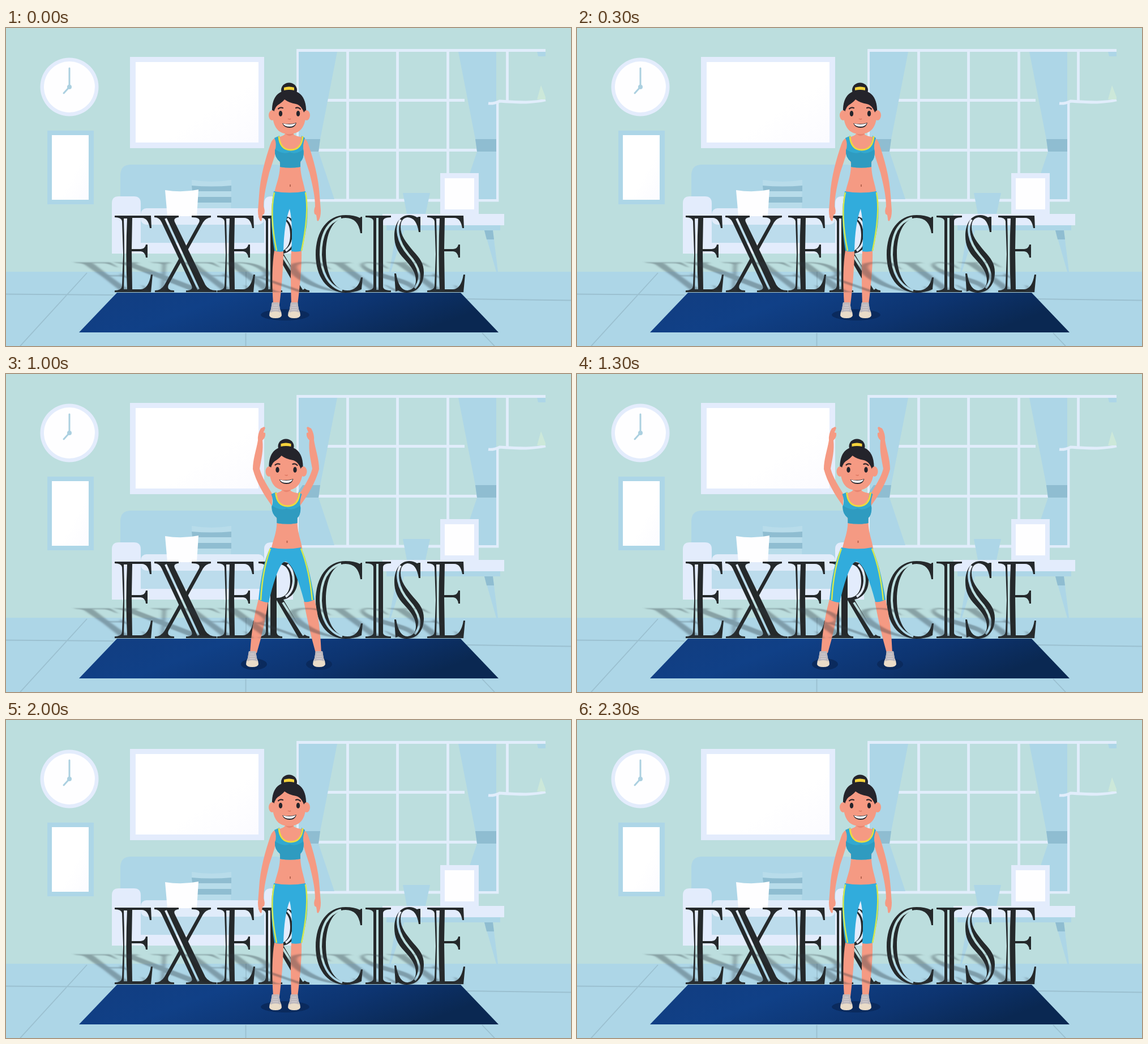
Animation of 998x561 px, one loop 2500 ms. Source, as an HTML page:

```html
<!DOCTYPE html>
<html lang="en">
<head>
<meta charset="utf-8">
<title>Exercise</title>
<style>
  html, body { margin: 0; width: 100%; height: 100%; overflow: hidden; }
  svg { display: block; width: 100%; height: 100%; }
  .pale { fill: #e3ecfc; }
  .blue { fill: #add6e7; }
  .deep { fill: #8fbdd1; }
  .white { fill: #fefeff; }
  .skin { fill: #f59a83; }
  .hair { fill: #24242b; }
  .sport { fill: #31acdc; }
  .line { fill: none; }
</style>
</head>
<body>
<svg viewBox="0 0 998 561">
  <defs>
    <linearGradient id="matFill" x2="1" y2=".25">
      <stop offset="0" stop-color="#123d80"/><stop offset=".35" stop-color="#104087"/>
      <stop offset=".7" stop-color="#0d3470"/><stop offset="1" stop-color="#0a2852"/>
    </linearGradient>
    <linearGradient id="glass" x2="1" y2="1">
      <stop offset=".6" stop-color="#fff"/><stop offset="1" stop-color="#fbfbff"/>
    </linearGradient>
    <filter id="soft" x="-10%" y="-20%" width="120%" height="140%"><feGaussianBlur stdDeviation="2.5"/></filter>

    <path id="e" d="M0 0H64L65 22H62Q59 4 48 4H31L30 59H46Q54 58 55 51H58V74H55Q54 64 46 63H30L31 130H46Q60 129 64 104H67L64 135H0V132Q12 132 13 124L15 68L13 10Q12 3 0 3Z"/>
    <path id="eLine" d="M16 5H22Q19 68 22 130H16Q18 68 16 5Z"/>
    <mask id="inline" maskUnits="userSpaceOnUse" x="180" y="-5" width="650" height="150">
      <path fill="#fff" d="M180-5H830V145H180Z"/>
      <use href="#eLine" x="192"/><use href="#eLine" x="373"/><use href="#eLine" x="744"/>
      <g fill="none" stroke="#000" stroke-width="4">
        <path d="M282 5L340 130M465 5V130M497 5Q508 15 508 34Q507 53 494 62M489 72L526 130"/>
        <path d="M592 4C563 12 556 42 556 69C557 98 568 124 594 132M656 4V131"/>
        <path d="M697 7C688 21 691 45 711 69C731 91 736 112 722 128"/>
      </g>
    </mask>
    <g id="word">
      <use href="#e" x="192"/><use href="#e" x="373"/><use href="#e" x="744"/>
      <path d="M262 0H305V3Q295 4 298 11L352 122Q358 132 372 132V135H318V132Q331 132 328 124L275 12Q271 3 262 3Z"/>
      <path d="M328 0H362V3Q353 4 348 12L287 122Q283 132 297 132V135H263V132Q274 132 280 122L341 12Q345 3 328 3Z"/>
      <path d="M446 0H484C508 0 515 14 515 33C515 52 504 64 490 67L520 118Q527 132 536 132V135H517L478 68V125Q479 132 488 132V135H446V132Q458 132 459 124V10Q458 3 446 3ZM478 4V64C495 64 502 52 502 34C502 15 495 4 478 4Z"/>
      <path d="M629 2V31H626Q622 4 600 4C576 4 565 34 565 67C565 104 580 132 603 132Q622 132 627 109H630L628 130Q615 136 600 136C566 136 547 106 547 69C547 27 568-1 600-1Q615-1 625 4L627 2Z"/>
      <path d="M635 0H680V3Q666 3 666 10V125Q666 132 680 132V135H635V132Q649 132 649 125V10Q649 3 635 3Z"/>
      <path d="M732 2V29H729Q725 3 709 3Q697 5 697 20C697 35 706 46 719 62C731 75 738 84 738 100C738 122 726 136 708 136Q699 136 693 132L688 134L686 102H689Q694 132 709 132Q724 130 724 114C724 101 716 90 704 77C691 64 686 51 686 36C686 14 696-1 712-1Q720-1 726 3L729 2Z"/>
    </g>

    <g id="bust">
      <path class="skin" d="M493 178H508V187Q510 191 527 193L520 240C520 262 526 272 529 291H474C478 272 484 262 484 240L474 194Q492 191 493 186Z"/>
      <path fill="#e98570" d="M493 183Q501 190 508 183V187Q501 194 493 186Z"/>
      <path fill="#32a9d0" d="M474 194L483 190Q485 216 503 216Q521 216 522 190L528 194Q523 208 526 218Q526 231 520 236V245Q502 248 484 245V236Q474 228 475 216Q479 205 474 194Z"/>
      <path fill="#2f9bc0" d="M475 214Q490 224 501 219Q513 224 525 214Q527 230 520 236V245Q502 248 484 245V236Q474 228 475 214Z"/>
      <path class="line" stroke="#ecd940" stroke-width="3" d="M482 191Q484 215 503 215Q522 215 524 191"/>
      <path class="line" stroke="#b96550" stroke-width="2" d="M502 276v4"/>
      <g class="hair">
        <ellipse cx="500" cy="109.500" rx="14" ry="13"/>
        <path d="M471 160C466 126 478 110 500 110C522 110 534 126 529 162Z"/>
      </g>
      <g class="skin"><ellipse cx="470" cy="154" rx="6" ry="9"/><ellipse cx="531" cy="154" rx="6" ry="9"/>
        <path d="M471 158Q474 140 480 136Q488 131 492 126Q500 132 512 134Q525 137 529 160C526 178 517 187 500 187C483 187 474 178 471 158Z"/></g>
      <g class="hair">
        <ellipse cx="485" cy="151" rx="3.2" ry="5"/><ellipse cx="516" cy="151" rx="3.2" ry="5"/>
        <path d="M488 168Q501 171 513 167Q511 176 501 176Q491 176 488 168Z"/>
      </g>
      <path fill="#f4d23c" d="M491 105q9-3 18 0v5q-9-2-18 0Z"/>
      <path class="white" d="M489 168.500Q501 171.500 512 168Q509 174 501 174Q492 174 489 168.500Z"/>
      <path class="line" stroke="#33262a" stroke-width="2.2" stroke-linecap="round" d="M481 142.500Q484 139 489 141M512 141Q516 139 520 143"/>
      <path class="line" stroke="#d9745f" stroke-width="1.5" d="M498 160q3 2 5 0"/>
    </g>
    <g id="shoe">
      <path fill="#eadcc8" d="M-6 0H6L8 12Q11 18 11 23Q10 28 0 28Q-10 28-11 23Q-11 18-8 12Z"/>
      <path fill="#bdb8bd" d="M-6 0H6L9 18Q0 14-9 18Z"/>
      <path class="line" stroke="#d8d3d8" d="M-4 5H4M-5 9H5M-5 13H5"/>
    </g>
  </defs>

  <path fill="#bcdede" d="M0 0H998V561H0Z"/>
  <path class="blue" d="M0 430H998V561H0Z"/>
  <path class="line" stroke="#9bc0d0" stroke-width="1.8" d="M0 469.500L190 471M143 432L25 561M424 430V466M423.500 538V561M841 538L863 561M812 478L998 480.500"/>

  <circle class="pale" cx="112" cy="104" r="51.500"/><circle class="white" cx="112" cy="104" r="45"/>
  <path class="line" stroke="#abd0e0" stroke-width="3" stroke-linecap="round" d="M112 71V104L102 115"/>
  <circle fill="#abd0e0" cx="112" cy="104" r="4"/>
  <path class="blue" d="M73 181H155V311H73Z"/><path fill="url(#glass)" d="M81 189H146V303H81Z"/>
  <path class="pale" d="M219 51H456V212H219Z"/><path fill="url(#glass)" d="M229 60H446V202H229Z"/>

  <path class="line" stroke="#e1edfb" stroke-width="4.800" d="M953 39.500H515.500V304H868V131M603.500 40V304M691.500 40V304M780.500 40V304M885.500 40V130M516 127.500H810M516 215.500H840"/>
  <path class="blue" d="M517 42H585L555 196L552 218L580 302H517ZM799 42H866V302H804L832 218L829 196ZM938 42H953V50H940Z"/>
  <path class="deep" d="M524 196H555L552 218H517V206ZM829 196H866V218H832Z"/>
  <path class="line" stroke="#e1edfb" stroke-width="4.800" d="M852 133Q862 134 872 129Q900 131 918 131Q940 130 953 127"/>
  <path fill="#cce8d9" d="M945 101L953 122V126H938Z"/>

  <path class="blue" d="M202 350V260Q202 241 221 241H476Q492 241 492 260V350Z"/>
  <path fill="#b8dcea" d="M328 268Q363 274 398 268L397 331H330Z"/>
  <path class="deep" d="M328 278Q363 281 398 278V288H329ZM329 298H398V308H329Z"/>
  <path fill="#bcdcec" d="M230 340H460V385H230Z"/>
  <rect fill="#e1ecfa" x="238" y="318" width="218" height="29" rx="10"/>
  <path class="white" d="M281 286Q311 291 340 285L337 332H285Z"/>
  <path class="pale" d="M187 398V309Q187 297 199 297H226Q238 297 238 309V379H456V309Q456 297 468 297H495Q507 297 507 309V398Z"/>

  <path class="blue" d="M690 357H703L680 430H677ZM845 357H860L869 430H866ZM701 291H749L741 328H708Z"/>
  <path class="deep" d="M845 357H860L862 373H849Z"/>
  <path class="blue" d="M672 347H873V357H672Z"/>
  <path class="pale" d="M665 328H880V348H665ZM767 256H835V328H767Z"/>
  <path class="white" d="M775 265H827V320H775Z"/>

  <path fill="url(#matFill)" d="M196 467H803L870 537H129Z"/>
  <g transform="translate(0 331)" fill="#25292b" role="img" aria-label="EXERCISE"><use href="#word" mask="url(#inline)"/></g>
  <g id="girl"></g>
  <g transform="matrix(1 0 .53 .39 -71.500 413.300)" opacity=".36" filter="url(#soft)"><use href="#word" fill="#2c363c"/></g>
</svg>
<script>
const poses = [
  {
    bust: [0, 0], axis: 500.5,
    arm: 'M480 193Q471 193 467 205C458 232 449 262 447 296L445 322Q445 334 449 340Q452 342 452 336L453 330L456 328Q458 322 455 315C455 295 461 272 465 255Q471 237 478 215Z',
    pants: 'M473 288Q501 293 529 288Q535 320 531 350L523 393Q514 396 504 394Q507 345 501 319Q491 345 490 394Q482 396 474 393Q464 330 473 288Z',
    trim: 'M474 290Q465 330 478 393M529 290Q536 325 522 393',
    shins: 'M474 392H490Q490 430 483 488H472Q468 430 474 392ZM504 392H522Q523 425 515 488H504Q502 430 504 392Z',
    feet: [[476, 484], [509, 484]], shade: [[493, 506, 43]]
  },
  {
    bust: [0, -15], axis: 500,
    arm: 'M478 178C462 179 425 189 408 196Q390 205 374 214L362 218Q353 225 351 231L356 231L360 229L358 233L363 230L366 231Q370 224 374 221Q390 215 404 211C430 205 455 199 478 190Z',
    pants: 'M474 272Q501 277 527 272Q538 300 536 340V375Q527 380 517 378Q515 330 506 306Q500 299 495 306Q486 330 482 379Q473 379 465 375Q460 315 474 272Z',
    trim: 'M474 274Q461 315 467 376M527 274Q540 315 534 376',
    shins: 'M465 374L482 378Q476 425 465 470H454Q455 420 465 374ZM517 377L535 374Q542 425 541 470H531Q522 425 517 377Z',
    feet: [[456, 466], [537, 466]], shade: []
  },
  {
    bust: [-5.5, 18], axis: 494.5,
    arm: 'M470 211C463 199 452 183 448 167C451 150 455 135 453 117Q459 112 458 104L455 103L458 95L456 93L450 96Q444 106 445 117C442 135 436 150 436 168C442 190 455 213 470 233Z',
    pants: 'M467 306Q494 311 521 306Q535 335 545 398Q536 403 527 402Q512 345 499 334Q494 328 488 334Q476 350 464 403Q455 403 446 398Q452 335 467 306Z',
    trim: 'M467 308Q453 345 450 399M521 308Q536 345 541 399',
    shins: 'M446 397L463 401Q457 445 443 492H431Q434 440 446 397ZM526 401L545 397Q555 440 557 492H547Q535 450 526 401Z',
    feet: [[435, 489], [553, 489]], shade: [[438, 512, 23], [553, 512, 23]]
  }
];

const drawPose = p => `<g>
  ${p.shade.map(([x, y, r]) => `<ellipse cx="${x}" cy="${y}" rx="${r}" ry="10" fill="#0a2a5d"/>`).join('')}
  <path class="skin" d="${p.shins}"/>
  ${p.feet.map(([x, y]) => `<use href="#shoe" x="${x}" y="${y}"/>`).join('')}
  <path class="skin" d="${p.arm}"/>
  <path class="skin" d="${p.arm}" transform="translate(${2 * p.axis}) scale(-1 1)"/>
  <use href="#bust" x="${p.bust[0]}" y="${p.bust[1]}"/>
  <path class="sport" d="${p.pants}"/>
  <path class="line" stroke="#d6e84c" stroke-width="2.5" d="${p.trim}"/>
</g>`;

const girl = document.getElementById('girl');
girl.innerHTML = poses.map(drawPose).join('');
const sequence = [0, 1, 2, 1, 0];

function tick() {
  const current = sequence[Math.floor(performance.now() / 500) % sequence.length];
  [...girl.children].forEach((pose, i) => pose.style.display = i === current ? '' : 'none');
  requestAnimationFrame(tick);
}
tick();
</script>
</body>
</html>
```
